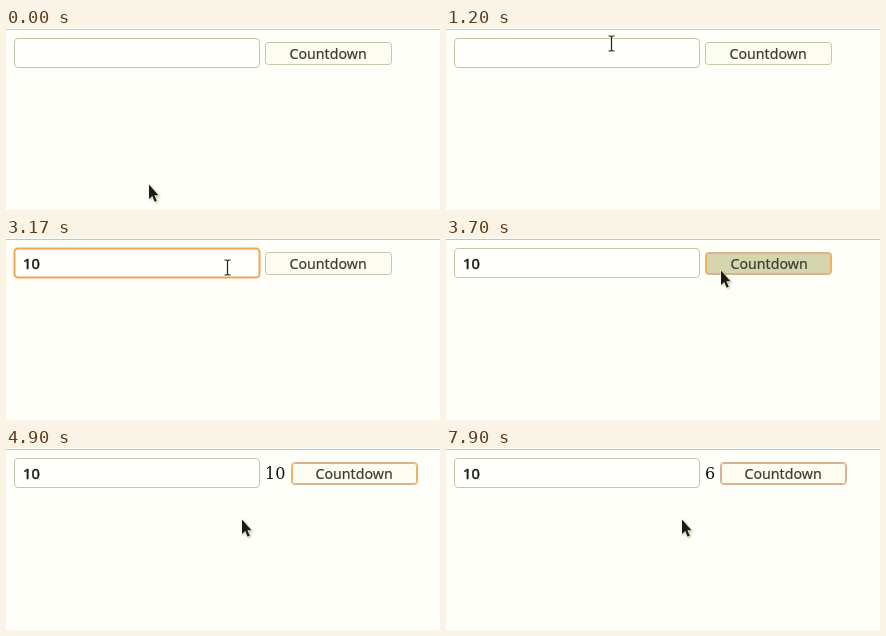
An HTML page for the animation above (8 s loop, 434 by 182 pixels).

```html
<!DOCTYPE html>
<html lang="en">
<head>
<meta charset="utf-8">
<title>Countdown</title>
<style>
html, body { margin: 0; width: 100%; height: 100%; overflow: hidden; background: #fffffa; }
svg { display: block; width: 434px; height: 182px; }
.ui { font: 14.2px "Noto Sans", "Open Sans", sans-serif; stroke-width: .2px; }
.field { font-size: 14.67px; stroke-width: .5px; }
.count { font: 16px "DejaVu Serif", serif; }
#arrow { filter: drop-shadow(1px 1px 1px #66660066); }
</style>
</head>
<body>
<svg viewBox="0 0 434 182">
  <rect width="434" height="182" fill="#fffffa"/>
  <rect y="1" width="434" height="1" fill="#c8c8a0"/>
  <rect id="input" x="8.5" y="10.5" width="245" height="29" rx="3.5" fill="#fffffd"/>
  <text id="value" class="ui field" x="17" y="31" fill="#1c1c18" stroke="#1c1c18"></text>
  <text id="count" class="count" x="259" y="31" fill="#111"></text>
  <g id="button">
    <rect id="face" x=".5" y="14.5" width="126" height="22" rx="3"/>
    <rect id="ring" x="1.5" y="15.5" width="124" height="20" rx="2" fill="none" stroke="#f0b060"/>
    <text id="label" class="ui" y="31" fill="#3c3c34" stroke="#3c3c34">Countdown</text>
  </g>
  <path id="arrow" d="M-.5 -1V13.4L2.8 10.5L5.1 16.2L7.3 15.2L4.9 9.7H9Z"
        fill="#1c1c14" stroke="#fffffa" stroke-width="1" paint-order="stroke"/>
  <path id="beam" d="M-3 -7.5H-1L0 -6.5L1 -7.5H3M0 -6.5V6.5M-3 7.5H-1L0 6.5L1 7.5H3"
        fill="none" stroke="#24241c" stroke-width="1.2"/>
</svg>
<script>
const LOOP = 8000;
const FOCUS = 1800, PRESS = 3670, RELEASE = 3900;
const TYPED = [[2730, "10"], [2500, "1"]];
const TICKS = [[7900, 6], [6900, 7], [5930, 8], [4930, 9], [RELEASE, 10]];
// Pointer stops: time, x, y
const PATH = [
  [0, 143, 157], [30, 143, 157], [870, 155, 74], [1200, 165, 15],
  [1330, 161, 29], [2900, 161, 29], [3170, 221, 29], [3460, 273, 38],
  [3640, 275, 33], [3900, 275, 33], [4570, 236, 72], [LOOP, 236, 72]
];

const el = id => document.getElementById(id);
const set = (id, attrs) => {
  for (const k in attrs) el(id).setAttribute(k, attrs[k]);
};
const show = on => on ? "visible" : "hidden";
const latest = (list, t) => {
  const hit = list.find(e => t >= e[0]);
  return hit ? hit[1] : "";
};
const ease = p => p * p * (3 - 2 * p);

function pointer(t) {
  const i = PATH.findIndex(p => p[0] > t);
  const [t0, x0, y0] = PATH[i - 1], [t1, x1, y1] = PATH[i];
  const p = ease((t - t0) / (t1 - t0));
  return [Math.round(x0 + (x1 - x0) * p), Math.round(y0 + (y1 - y0) * p)];
}

function draw(t) {
  const editing = t >= FOCUS && t < PRESS;
  const pressed = t >= PRESS && t < RELEASE;
  const focused = t >= PRESS;
  const count = String(latest(TICKS, t));

  set("input", {
    stroke: editing ? "#f2a650" : "#c6c6a8",
    "stroke-width": editing ? 2 : 1
  });
  el("value").textContent = latest(TYPED, t);
  el("count").textContent = count;

  const left = [259, 274, 285][count.length];
  set("button", { transform: `translate(${left} 0)` });
  set("face", {
    fill: pressed ? "#d6d6ae" : "#fcfcf1",
    stroke: focused ? "#d8b494" : "#c6c6a8"
  });
  set("ring", { visibility: show(focused) });
  set("label", { x: pressed ? 25.5 : 24.5 });

  const [x, y] = pointer(t);
  const inField = x > 8 && x < 254 && y > 10 && y < 40;
  const transform = `translate(${x + .5} ${y + .5})`;
  set("arrow", { transform, visibility: show(!inField) });
  set("beam", { transform, visibility: show(inField) });
}

const start = performance.now();
function frame() {
  draw((performance.now() - start) % LOOP);
  requestAnimationFrame(frame);
}
frame();
</script>
</body>
</html>
```
